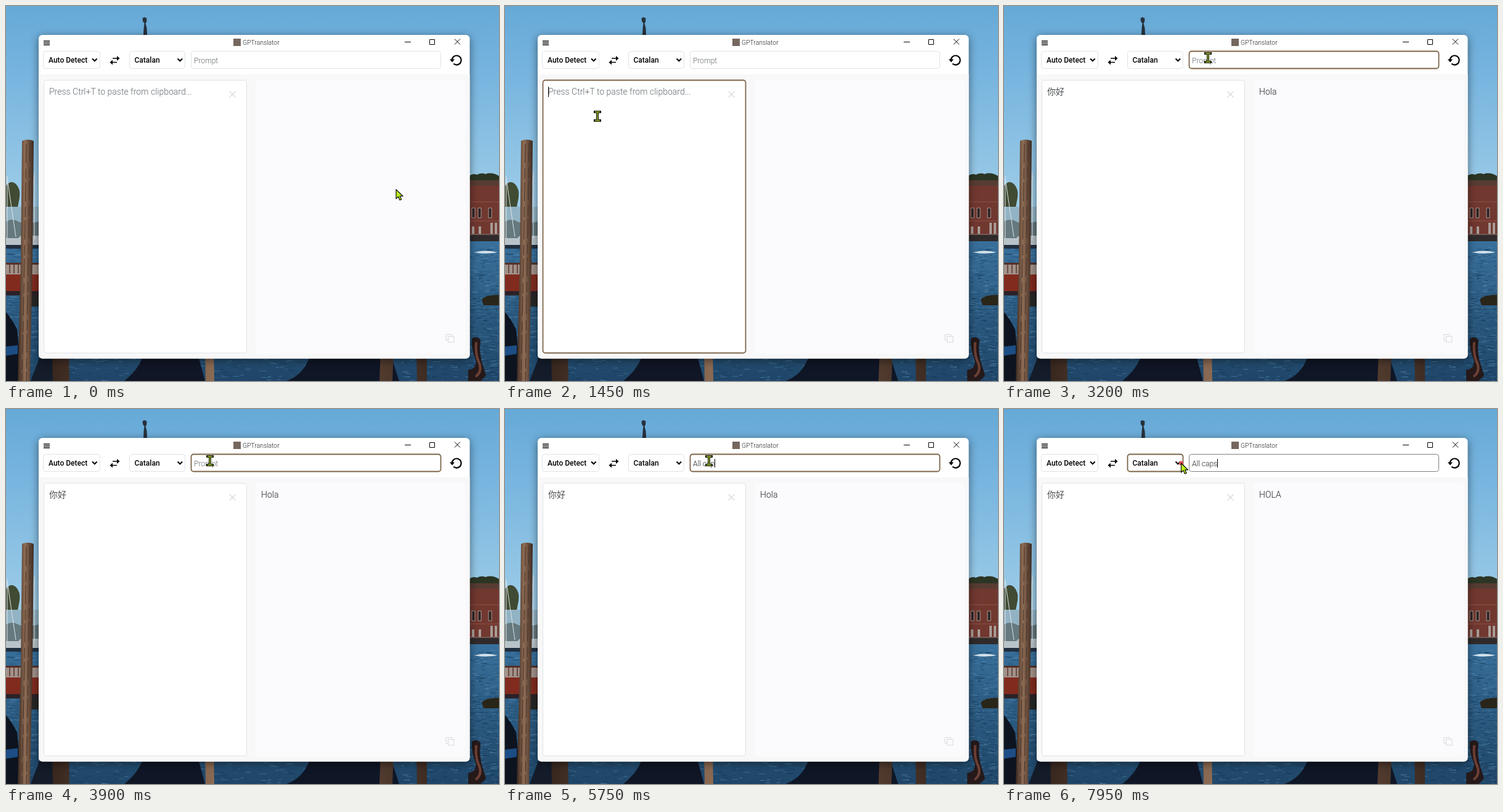
An HTML page that plays this animation: 800 by 609 pixels, repeating every 8 s.

```html
<!DOCTYPE html>
<html lang="en">
<head>
<meta charset="utf-8">
<title>Translator demo</title>
<style>
  html, body { margin: 0; width: 100%; height: 100%; overflow: hidden; }
  svg { display: block; width: 100%; height: 100%; }
  text { font-family: Roboto, sans-serif; font-weight: 300; white-space: pre; fill: #212529; }
  .big { font-size: 14px; }
  .small { font-size: 12px; }
  .label { font-size: 12px; font-weight: 500; fill: #000; }
  .cjk { font-family: "Noto Sans CJK SC", "Noto Sans CJK", sans-serif; fill: #4a4d50; }
  .hint { fill: #656b70; }
  .line { fill: none; stroke: #000; }
  .faint { fill: none; stroke: #d9d9de; }
  .window { filter: drop-shadow(0 3px 7px rgba(0, 0, 0, .5)); }
</style>
</head>
<body>
<svg viewBox="0 0 800 609" preserveAspectRatio="none">
  <defs>
    <linearGradient id="sky" x1="0" y1="0" x2="0" y2="1">
      <stop offset="0" stop-color="#66a9d7"/>
      <stop offset=".3" stop-color="#78b5df"/>
      <stop offset=".75" stop-color="#98c9e6"/>
      <stop offset="1" stop-color="#a8d0e6"/>
    </linearGradient>
    <linearGradient id="sea" x1="0" y1="0" x2="0" y2="1">
      <stop offset="0" stop-color="#38709c"/>
      <stop offset="1" stop-color="#1f4668"/>
    </linearGradient>
    <linearGradient id="wood">
      <stop offset="0" stop-color="#38271e"/>
      <stop offset=".45" stop-color="#8f6d55"/>
      <stop offset="1" stop-color="#3f2c23"/>
    </linearGradient>
  </defs>

  <rect width="800" height="390" fill="url(#sky)"/>
  <rect y="382" width="800" height="227" fill="url(#sea)"/>
  <g id="ripples" fill="none"></g>

  <!-- harbour, right -->
  <path d="M750 277q8-6 14-3q8-4 14-1q10-4 22 3v12h-50z" fill="#2c3524"/>
  <rect x="750" y="283" width="50" height="97" fill="#713830"/>
  <path d="M750 283h50v9h-50z" fill="#573c32"/>
  <path d="M750 318h50M750 349h50" stroke="#8c5347"/>
  <path d="M756 328h5v16h-5zM766 328h5v16h-5zM783 328h5v16h-5z" fill="#2d2224" stroke="#b09a8f"/>
  <path d="M756 358h4v12h-4zM767 358h4v12h-4zM786 352h4v18h-4zM793 352h4v18h-4z" fill="#a89c96"/>
  <path d="M750 371h50v11h-50z" fill="#302a2b"/>
  <path d="M750 371h50" stroke="#8d817b"/>
  <path d="M760 400q18-5 38 0q-18 4-38 0z" fill="#cfdfe9"/>
  <path d="M772 477q5-8 28-8v17h-25z" fill="#2a2519"/>
  <path d="M756 540q8-5 14 2l-1 14q1 18 5 28l5 16-9 9h-20v-18q15-2 12-17q-7-16-6-34z" fill="#25191a"/>
  <path d="M763 546q-2 20 5 34q5 14-6 22" fill="none" stroke="#6d4034" stroke-width="4"/>

  <!-- harbour, left -->
  <path d="M0 292q8-10 16-3q8 8 6 22l-3 16h-19z" fill="#404b33"/>
  <path d="M0 326h53v52h-53z" fill="#92b3c4"/>
  <path d="M0 350q10-6 20 0t33 0v27h-53z" fill="#65797e"/>
  <path d="M0 377h20l4-4h29v15h-53z" fill="#b9c4c9"/>
  <path d="M0 388h53v6h-53z" fill="#202f3f"/>
  <path d="M2 276v102M46 270v108M2 280l14 95M46 276l-12 99" stroke="#dbe3e7" fill="none"/>
  <path d="M0 418h53v18h-53z" fill="#a1928a"/>
  <path d="M6 420v14M13 420v14M20 420v14" stroke="#6b4a42" stroke-width="2"/>
  <path d="M0 417h53v3h-53z" fill="#563026"/>
  <path d="M0 436h53v28h-53z" fill="#812b1f"/>
  <path d="M0 463h53v7h-53z" fill="#2b2228"/>
  <path d="M40 470h13v18h-13z" fill="#262825"/>
  <path d="M0 497q10 12 18 28l8 84h-26z" fill="#0d131f"/>
  <path d="M0 553l19-2v14l-19 3z" fill="#1c4d84"/>
  <path d="M26 219q9-4 19 0l-2 195-4 195h-20l5-195z" fill="url(#wood)"/>
  <path d="M33 224l-3 190-4 195M39 222l-3 192-3 195" fill="none" stroke="#46322a" stroke-dasharray="31 9 17 5"/>

  <!-- foreground, bottom -->
  <path d="M192 609q22-18 29-37h92l10 37z" fill="#101626"/>
  <path d="M455 609q26-9 37-37h134l12 37z" fill="#0f1626"/>
  <path d="M40 609l14-37h22v37z" fill="#141c2a"/>
  <path d="M75 560h27l1 49h-27zM323 560h14l1 49h-14zM608 560h21l-2 49h-21zM666 560h17v49h-16z" fill="url(#wood)"/>
  <path d="M221.500 20l3-2 4 2-.5 6-1.500 2 2 8 .5 11h-6l.5-11 1-8-2.500-3z" fill="#27313c"/>

  <!-- window -->
  <rect class="window" x="53" y="47" width="699.5" height="525.5" rx="6" fill="#fff"/>
  <path d="M53 111h699.500v455.500a6 6 0 0 1-6 6h-687.500a6 6 0 0 1-6-6z" fill="#f8f8f9"/>
  <rect x="405" y="120" width="341" height="444" rx="4" fill="#fbfafc"/>
  <path class="line" stroke-width="1.300" d="M61 57h10M61 60h10M61 63h10"/>
  <rect x="369" y="53" width="12" height="12" fill="#75675f"/>
  <text x="384" y="63" font-size="10.400">GPTranslator</text>
  <path class="line" d="M647 58.500h10M687.500 54.500h8v8h-8zM728 53.500l9 9M737 53.500l-9 9"/>

  <g id="fields" stroke="#dee2e6"></g>
  <text class="label" x="69" y="91.500">Auto Detect</text>
  <text class="label" x="208.500" y="91.500">Catalan</text>
  <path class="line" stroke-width="2" d="M140 85.500l3.800 3.800 3.800-3.800M278.500 85.500l3.800 3.800 3.800-3.800"/>
  <path class="line" stroke-width="1.700" d="M173 85h10M172 91.500h8"/>
  <path d="M180 81l4.500 4-4.500 4zM173 87.500l-4.500 4 4.500 4z"/>
  <path class="line" stroke-width="2.200" d="M723.700 88a7.500 7.500 0 1 1 2.600 5.700"/>
  <path d="M720 86.500h8l-4 5z"/>
  <path class="faint" stroke-width="1.200" d="M362.500 138.500l10 10M372.500 138.500l-10 10"/>
  <path class="faint" d="M717.500 536.500h9.500v9.500h-9.500zM717 543h-3v-9.500h9.500v3"/>

  <text id="source" x="70" y="144"></text>
  <text id="result" class="big" x="414" y="144"></text>
  <text id="prompt" x="305" y="92.500"></text>
  <rect id="caret" width="1" fill="#000"/>
  <path id="spinner" class="line" stroke-width="2" d="M9.900 9.900A14 14 0 1 1 9.900-9.900"/>
  <circle id="press" r="3.600" fill="#e2504e"/>
  <path id="arrow" d="M0 0V15l3.500-3.200L6 17.200l2.600-1.100-2.500-5.300H11z" fill="#b9f01c" stroke="#111" stroke-width="1.200" stroke-linejoin="round"/>
  <g id="beam" fill="none">
    <path d="M-4-7H4M0-7V7M-4 7H4" stroke="#1b2008" stroke-width="4" stroke-linecap="square"/>
    <path d="M-4-7H4M0-7V7M-4 7H4" stroke="#7f952b" stroke-width="2"/>
  </g>
</svg>
<script>
const LOOP = 8000;
const FOCUS = { area: 1350, prompt: 2450, select: 7900 };
const TYPED = "All caps", TYPE_START = 4500, KEY_GAP = 180;
const SPINS = [[1750, 3200], [6150, 6900]];
const MOVES = [
  [300, 1250, 633, 298, 150, 179],
  [1880, 2420, 150, 179, 332, 82],
  [2520, 2640, 332, 82, 331, 84],
  [7400, 7850, 331, 84, 287.5, 88]
];
const $ = id => document.getElementById(id);

function add(parent, tag, attrs) {
  const el = document.createElementNS(parent.namespaceURI, tag);
  set(el, attrs);
  parent.appendChild(el);
  return el;
}
function set(el, attrs) {
  for (const k in attrs) el.setAttribute(k, attrs[k]);
}
function show(el, on) {
  el.style.display = on ? "" : "none";
}
function write(el, str, cls) {
  if (el.textContent !== str) el.textContent = str;
  el.setAttribute("class", cls);
}
const inside = (t, [a, b]) => t >= a && t < b;
const clamp = v => Math.max(0, Math.min(1, v));
const ease = v => v * v * (3 - 2 * v);

// static water texture
let seed = 11;
const rand = () => (seed = seed * 16807 % 2147483647) / 2147483647;
for (let i = 0; i < 1100; i++) {
  const side = i % 3;
  const x = side === 0 ? rand() * 53 : side === 1 ? 750 + rand() * 50 : rand() * 800;
  const y = side === 2 ? 572 + rand() * 37 : 392 + rand() * 217;
  const w = 3 + rand() * 9;
  add($("ripples"), "path", {
    d: `M${x} ${y}q${w / 2} ${rand() * 3 - 1.5} ${w} 0`,
    stroke: rand() < .6 ? "#12334f" : "#5f90b4",
    "stroke-opacity": .25 + rand() * .4
  });
}

const field = (x, y, w, h) =>
  add($("fields"), "rect", { x: x + .5, y: y + .5, width: w, height: h, rx: 4, fill: "#fff" });
field(60, 73, 92, 28);
const select = field(200, 73, 90, 28);
const prompt = field(300, 73, 405, 28);
const area = field(61, 120, 329, 443);

// thick brown while focused, then a dark edge that fades out
function border(el, t, from, to) {
  const focused = inside(t, [from, to]);
  let color = "#dee2e6";
  if (focused) color = "#7d6549";
  else if (t >= to) {
    const k = clamp((t - to) / 150);
    const mix = (a, b) => Math.round(a + (b - a) * k);
    color = `rgb(${mix(76, 222)},${mix(78, 226)},${mix(80, 230)})`;
  }
  set(el, { stroke: color, "stroke-width": focused ? 1.8 : 1 });
}

function pointer(t) {
  let x = 633, y = 298;
  for (const [a, b, x0, y0, x1, y1] of MOVES) {
    if (t < a) break;
    const k = ease(clamp((t - a) / (b - a)));
    x = x0 + (x1 - x0) * k;
    y = y0 + (y1 - y0) * k;
  }
  return [x, y];
}

function drawCaret(t, typed) {
  const inPrompt = t >= FOCUS.prompt;
  const text = inPrompt ? $("prompt") : $("source");
  const filled = inPrompt ? typed : t >= SPINS[0][0];
  let base = FOCUS.area;
  if (inPrompt) base = typed ? TYPE_START + (typed - 1) * KEY_GAP : 2400;
  else if (filled) base = SPINS[0][0];
  const on = (t - base) % 1000 < 500 && t >= FOCUS.area && !inside(t, [FOCUS.prompt, 2550]);
  show($("caret"), on);
  if (!on) return;
  const x = (inPrompt ? 305 : 70) + (filled ? text.getComputedTextLength() : 0);
  set($("caret"), { x: Math.floor(x), y: inPrompt ? 81 : 131, height: inPrompt ? 14 : 17 });
}

function draw(t) {
  border(area, t, FOCUS.area, FOCUS.prompt);
  border(prompt, t, FOCUS.prompt, FOCUS.select);
  border(select, t, FOCUS.select, LOOP);

  if (t < SPINS[0][0]) write($("source"), "Press Ctrl+T to paste from clipboard...", "big hint");
  else write($("source"), "你好", "big cjk");

  const typed = Math.max(0, Math.min(TYPED.length, Math.floor((t - TYPE_START) / KEY_GAP) + 1));
  write($("prompt"), typed ? TYPED.slice(0, typed) : "Prompt", typed ? "small" : "small hint");

  const spin = SPINS.find(s => inside(t, s));
  const done = t >= SPINS[1][1] ? "HOLA" : t >= SPINS[0][1] ? "Hola" : "";
  write($("result"), spin ? "" : done, "big");
  show($("spinner"), spin);
  if (spin) set($("spinner"), { transform: `translate(574 342) rotate(${(t - spin[0]) / 750 * 360})` });

  drawCaret(t, typed);

  const [x, y] = pointer(t);
  const overArea = x > 61 && x < 391 && y > 120 && y < 564;
  const overPrompt = x > 300 && x < 706 && y > 73 && y < 102;
  const beam = overArea || overPrompt;
  const at = { transform: `translate(${x} ${y})` };
  set($("arrow"), at);
  set($("beam"), at);
  set($("press"), at);
  show($("arrow"), !beam);
  show($("beam"), beam);
  show($("press"), Object.values(FOCUS).some(f => inside(t, [f - 50, f + (f === FOCUS.select ? 100 : 50)])));
}

const start = performance.now();
function tick() {
  draw((performance.now() - start) % LOOP);
  requestAnimationFrame(tick);
}
draw(0);
requestAnimationFrame(tick);
</script>
</body>
</html>
```
